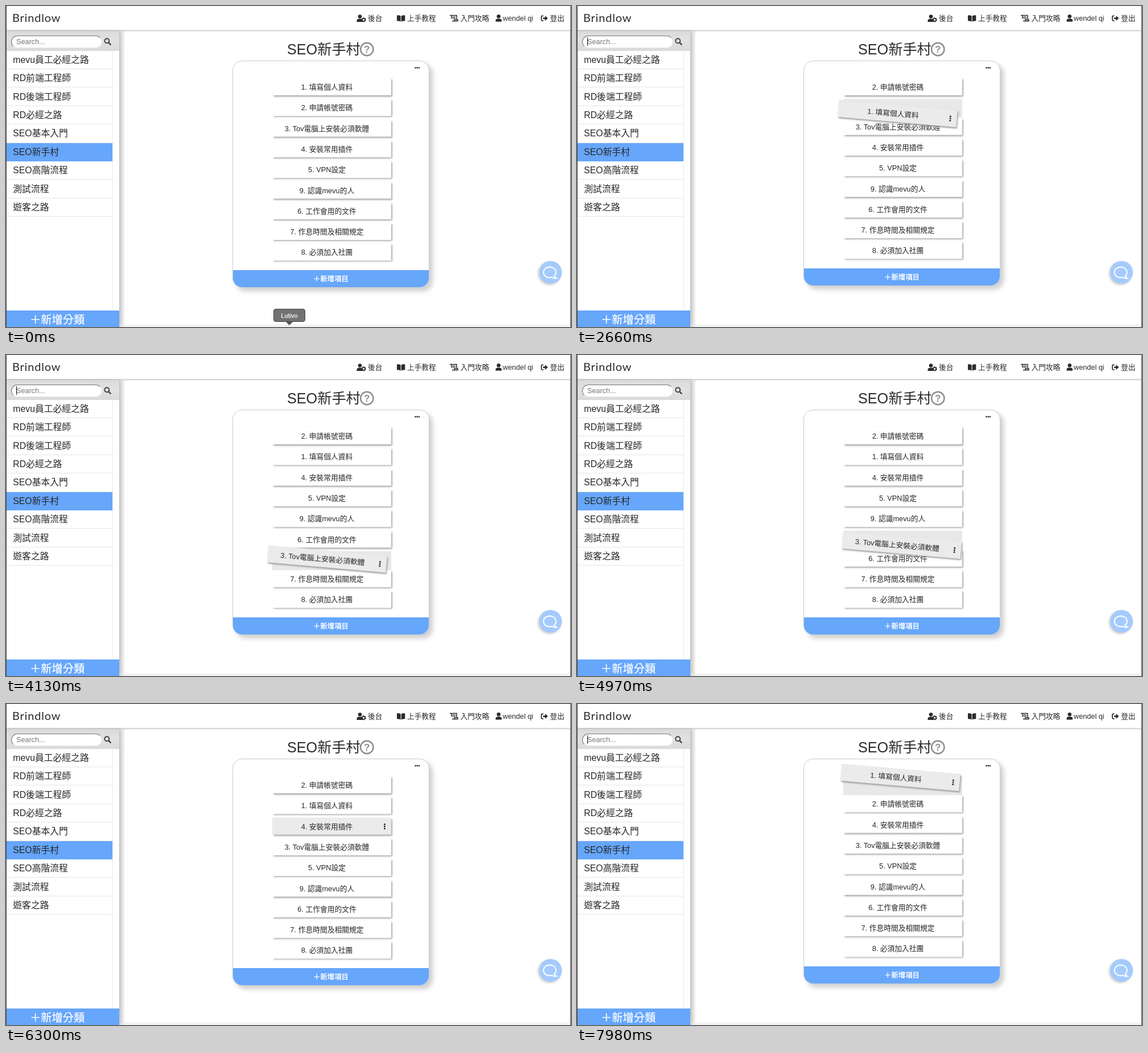
These frames come from a looping animation (993x564 px, 8 s). An HTML page:

```html
<!DOCTYPE html>
<html lang="zh-Hant">
<head>
<meta charset="utf-8">
<title>新手村</title>
<style>
html, body { margin: 0; width: 100%; height: 100%; overflow: hidden; background: #fff; }
body, text { font-family: "Liberation Sans", "Noto Sans CJK TC", "Noto Sans CJK", sans-serif; }
#stage { position: relative; width: 993px; height: 564px; overflow: hidden; color: #262626; }
#stage div, svg { position: absolute; box-sizing: border-box; }
svg { left: 0; top: 0; }
.main { left: 199px; top: 43px; width: 793px; height: 521px; background: #f2f2f2; }
.panel { left: 9px; top: 2px; width: 783px; height: 514px; border-radius: 5px 0 0 0; background: #fff; box-shadow: 0 0 3px #fff; }
.side { left: 1px; top: 43px; width: 197.5px; height: 521px; background: #fff; box-shadow: 2px 0 8px #aaa; }
.find { width: 198px; height: 36px; background: linear-gradient(#dadada, #e2e2e2 50%, #dadada); }
.find div { left: 8px; top: 9px; width: 160px; height: 22px; border: 1px solid #999; border-color: #777 #e4e4e4 #e4e4e4 #777; border-radius: 11px; background: #fff; font: 12.6px/20px "Liberation Sans", sans-serif; color: #767676; padding-left: 8px; }
.row { left: 0; width: 186px; height: 32.4px; padding-left: 11.3px; border-bottom: 1px solid #e6e6e6; font-size: 15.8px; line-height: 32.6px; white-space: nowrap; }
.row.on { background: #66a6fb; border-color: #66a6fb; }
.gutter { left: 185.5px; top: 36px; width: 1px; height: 456px; background: #ebebeb; }
.add { left: 0; bottom: 0; width: 198px; height: 29.5px; background: #66a6fb; color: #fff; font-size: 19.3px; line-height: 34px; padding-left: 41px; -webkit-text-stroke: .25px #fff; }
.head { left: 0; top: 0; width: 993px; height: 42px; background: #fff; box-shadow: 0 1px 3px #b8b8b8; }
#card { left: 398px; top: 96px; width: 345.5px; border: 1px solid #ccc; border-radius: 17px; background: #fff; box-shadow: 6px 6px 8px #cfcfcf; overflow: hidden; }
#card div { left: -1px; bottom: -1px; width: 346px; height: 31px; background: #66a6fb; color: #fff; font-size: 12.4px; line-height: 32px; text-align: center; -webkit-text-stroke: .4px #fff; }
.item, #slot { left: 467.5px; top: 0; width: 209px; }
.item { height: 30px; padding-right: 16px; background: #fff; box-shadow: 1.5px 2px 3px #999; font-size: 12.75px; line-height: 31.4px; text-align: center; white-space: nowrap; }
#slot { height: 33.3px; background: #e8e8e8; }
.item::after { content: ""; position: absolute; left: 196px; top: 10px; width: 3px; height: 11px; background: radial-gradient(circle, #222 1.1px, transparent 1.7px) 0 0 / 3px 3.7px; visibility: hidden; }
.item.hot { background: #ebebeb; }
.item.hot::after { visibility: visible; }
.item.held { z-index: 3; }
#tip { left: 470px; top: 532px; width: 56px; height: 23px; border: 1px solid #444; border-radius: 4px; background: #727272; color: #fff; font-size: 11px; line-height: 22px; text-align: center; -webkit-text-stroke: .2px #fff; }
#tip::after { content: ""; position: absolute; left: 21px; top: 22px; border: 6px solid transparent; border-top-color: #555; }
#caret { left: 18px; top: 55px; width: 1px; height: 15px; background: #111; }
.chat { left: 936.5px; top: 447.5px; width: 40px; height: 40px; border-radius: 50%; background: #a4cbfc; box-shadow: -2px 2px 4px #ccc; }
</style>
</head>
<body>
<div id="stage">
  <div class="main"><div class="panel"></div></div>
  <div class="side" id="side">
    <div class="find"><div>Search...</div></div>
    <div class="gutter"></div>
    <div class="add">＋新增分類</div>
  </div>
  <div class="head"></div>
  <div id="card"><div>＋新增項目</div></div>
  <div id="slot"></div>
  <div class="chat"></div>
  <svg width="993" height="564" fill="#2b2b2b">
    <text x="11" y="27.5" font-size="20" letter-spacing=".8" style="font-family:Lato,sans-serif">Brindlow</text>
    <g font-size="12.7">
      <text x="636" y="26.3">後台</text>
      <text x="705" y="26.3">上手教程</text>
      <text x="798.5" y="26.3">入門攻略</text>
      <text x="873" y="26">wendel qi</text>
      <text x="956" y="26.3">登出</text>
    </g>
    <text x="494" y="85.3" font-size="25.2">SEO新手村</text>
    <!-- navigation icons -->
    <circle cx="622" cy="18.5" r="3.3"/>
    <path d="M616.5 28v-2q0-3.5 4-3.5h3q2 0 2.5 2l1 3.5z"/>
    <g fill="none" stroke="#2b2b2b">
      <circle cx="628.6" cy="24.3" r="2.6" stroke-width="1.8"/>
      <circle cx="628.6" cy="24.3" r="3.6" stroke-width="1.2" stroke-dasharray="1.9 1.87"/>
    </g>
    <path d="M687 16.5q4-.6 6.6 1v10q-2.6-1.4-6.6-1.2zM701.3 16.5q-4-.6-6.6 1v10q2.6-1.4 6.6-1.2z"/>
    <g fill="none" stroke="#2b2b2b" stroke-width="1.5">
      <path d="M780 16.5h3v6M783 16.5h9v7.5M784 26.5h10v-2.5h-6v2.5"/>
      <path d="M785.5 22v-3h3.5v3h-3.5" stroke-width="1.2"/>
    </g>
    <circle cx="865.8" cy="18.3" r="3.3"/>
    <path d="M860.5 27.5v-1.5q0-3.7 4-3.7h2.6q4 0 4 3.7v1.5z"/>
    <path d="M944.5 17.3h-2q-1.6 0-1.6 1.6v5.4q0 1.6 1.6 1.6h2" fill="none" stroke="#2b2b2b" stroke-width="1.7"/>
    <path d="M944 20.2h3.5v-3.2l4.8 4.6-4.8 4.6v-3.2h-3.5z"/>
    <g fill="none" stroke="#444" stroke-width="2">
      <circle cx="177.3" cy="61.3" r="4"/><path d="M180.3 64.3l4 4" stroke-width="2.5"/>
    </g>
    <circle cx="634.3" cy="76" r="11.2" fill="none" stroke="#8c8c8c" stroke-width="2.4"/>
    <text x="634.3" y="82" font-size="17" font-weight="700" fill="#8c8c8c" text-anchor="middle">?</text>
    <path d="M719.5 108.5h.01M722.7 108.5h.01M725.9 108.5h.01" stroke="#222" stroke-width="2.7" stroke-linecap="round"/>
    <path d="M963.5 474.5a11 9.3 0 1 0-4 2.2q3 2.2 8 1.6-3-1.6-4-3.800z" fill="none" stroke="#fff" stroke-width="2"/>
    <path d="M.5 0v564M992.5 0v564" stroke="#444"/>
  </svg>
  <div id="tip">Lutivo</div>
  <div id="caret"></div>
</div>
<script>
const LOOP = 8000, TOP = 127, PITCH = 36.3, REST_X = 572, HALF = 15;
const $ = id => document.getElementById(id);

function addDiv(parent, className, text) {
  const el = document.createElement('div');
  el.className = className;
  el.textContent = text;
  return parent.appendChild(el);
}

['mevu員工必經之路', 'RD前端工程師', 'RD後端工程師', 'RD必經之路', 'SEO基本入門',
 'SEO新手村', 'SEO高階流程', '測試流程', '遊客之路'].forEach((name, i) => {
  addDiv($('side'), i === 5 ? 'row on' : 'row', name).style.top = 35.7 + i * 32.4 + 'px';
});

const items = ['1. 填寫個人資料', '2. 申請帳號密碼', '3. Tov電腦上安裝必須軟體', '4. 安裝常用插件',
  '5. VPN設定', '9. 認識mevu的人', '6. 工作會用的文件', '7. 作息時間及相關規定', '8. 必須加入社團']
  .map(name => addDiv($('stage'), 'item', name));

// Each path point is [time, centre x, centre y].
const drags = [
  { from: 0, to: 1, path: [[1890, 572, 142], [2450, 563, 187], [2660, 563, 189], [2870, 563, 189]] },
  { from: 2, to: 3, path: [[3290, 572, 215], [4130, 564, 358.5], [4400, 565, 370], [4700, 568, 358],
    [5460, 576, 276], [5740, 577, 255], [5880, 577, 254]] },
  { from: 1, to: 0, path: [[6790, 572, 179], [7600, 568, 132], [8000, 568, 129]] }
];

// [start, end, hovered slot]
const hovers = [[1050, 1890, 0], [2870, 3050, 1], [3050, 3290, 2],
  [5880, 6090, 3], [6090, 6440, 2], [6440, 6790, 1]];

function pointAt(path, t) {
  const i = path.findIndex(p => p[0] > t);
  const [a, b] = [path[i - 1], path[i]];
  const u = (t - a[0]) / (b[0] - a[0]), e = u * u * (3 - 2 * u);
  return [a[1] + (b[1] - a[1]) * e, a[2] + (b[2] - a[2]) * e];
}

function move(order, from, to) {
  order.splice(to, 0, order.splice(from, 1)[0]);
}

function render(t) {
  const order = items.slice();
  let held = null, pos, slot = -1;
  for (const { from, to, path } of drags) {
    if (t < path[0][0]) break;
    if (t >= path[path.length - 1][0]) { move(order, from, to); continue; }
    pos = pointAt(path, t);
    slot = Math.max(0, Math.min(8, Math.round((pos[1] - TOP - HALF) / PITCH)));
    held = order[from];
    move(order, from, slot);
  }
  const hover = hovers.find(h => t >= h[0] && t < h[1]);
  order.forEach((el, i) => {
    const isHeld = el === held;
    el.classList.toggle('held', isHeld);
    el.classList.toggle('hot', isHeld || !!hover && hover[2] === i);
    const y = TOP + i * PITCH - (held && i > slot ? 3 : 0);
    el.style.transform = isHeld
      ? `translate(${pos[0] - REST_X}px, ${pos[1] - HALF}px) rotate(5deg)`
      : `translateY(${y}px)`;
  });
  $('slot').style.display = held ? 'block' : 'none';
  $('slot').style.transform = `translateY(${TOP + slot * PITCH}px)`;
  $('card').style.height = (held ? 396 : 399) + 'px';
  $('tip').style.display = t < 420 ? 'block' : 'none';
  const blink = t % 630;
  $('caret').style.display = blink >= 130 && blink < 480 ? 'block' : 'none';
}

function tick() {
  render(performance.now() % LOOP);
  requestAnimationFrame(tick);
}
tick();
</script>
</body>
</html>
```
